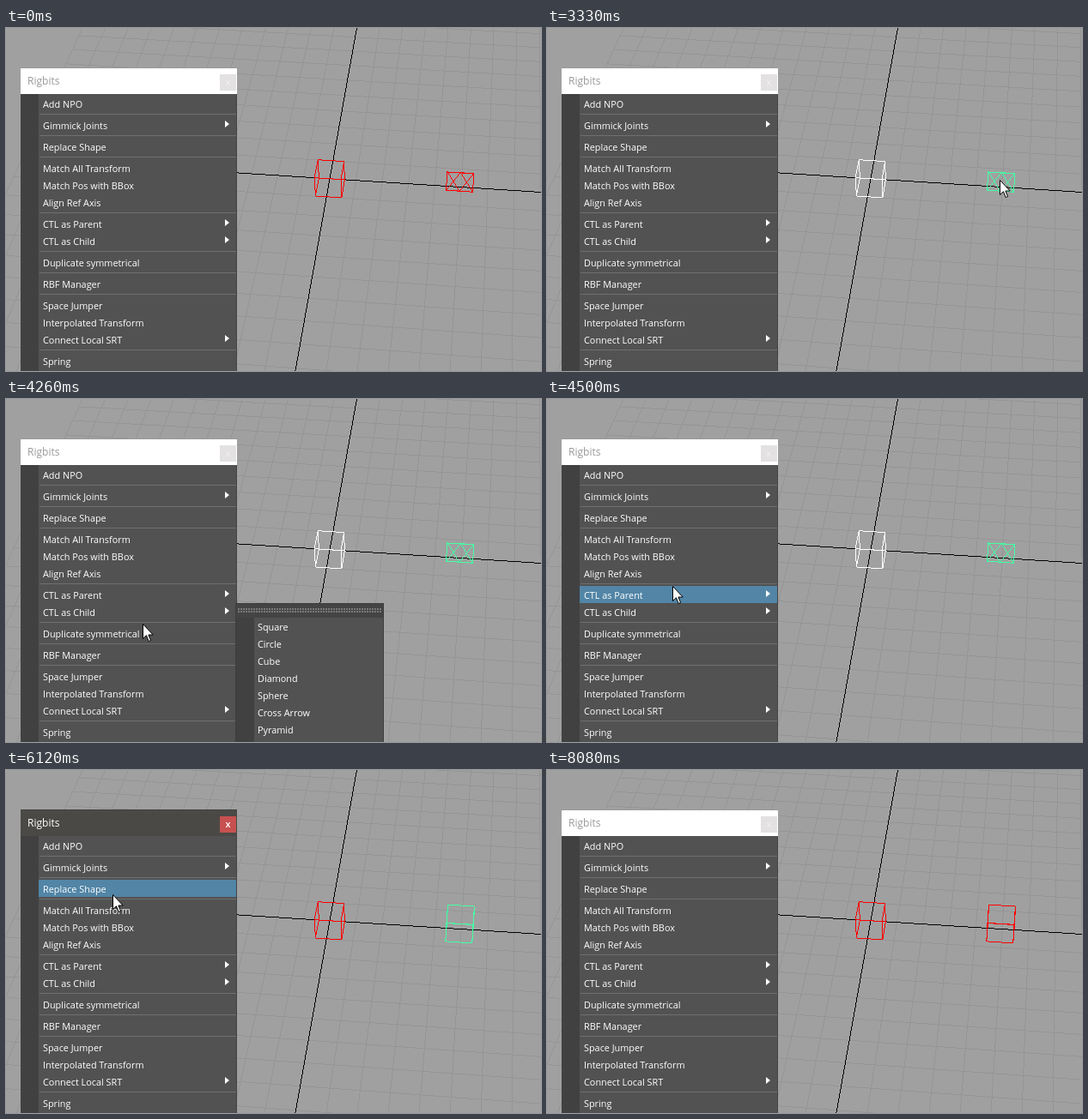
An HTML page with a canvas that plays this animation: 623x400 px, repeating every 9.07 s.

```html
<!DOCTYPE html>
<html lang="en">
<head>
<meta charset="utf-8">
<title>Rigbits: replace shape</title>
<style>
  html, body { margin: 0; width: 100%; height: 100%; overflow: hidden; background: #a0a0a0; }
  #stage { position: absolute; left: 0; top: 0; width: 623px; height: 400px; overflow: hidden;
    font: 10.85px/21px "Open Sans", "Noto Sans", sans-serif; color: #fff; }
  #stage * { position: absolute; box-sizing: border-box; white-space: nowrap; }
  .panel { background: #525252; border-right: 1px solid #434343; }
  .gutter { left: 0; bottom: 0; width: 21px; background: #414141; }
  #menu { left: 17px; top: 46px; width: 252px; height: 354px; }
  #menu .gutter { top: 31px; }
  #bar { left: 0; top: 0; width: 252px; height: 31px; background: #fff; color: #999; border-top: 1px solid #9a9a9a; }
  #bar b { left: 8px; top: -1px; font: 12px/31px "Open Sans", "Noto Sans", sans-serif; }
  #close { left: 232px; top: 7px; width: 19px; height: 19px; background: #e3e1e1; color: #f2f2f2;
    font-size: 11px; line-height: 17px; text-align: center; }
  #bar.on { background: #4b4946; color: #fff; border-color: #434140; }
  #bar.on #close { background: #c75050; color: #fff; font-weight: 600; }
  .row { left: 21px; width: 230px; height: 20px; padding-left: 5px; }
  .row.hot { background: #5285a6; }
  .rule { left: 22px; width: 229px; height: 1px; background: #707070; }
  .arrow { right: 8px; border: 4px solid transparent; border-left: 5px solid #fff; border-right: 0; }
  #sub { left: 267px; top: 238px; width: 173px; height: 170px; border: 1px solid #3c3c3c; }
  #sub .gutter { top: 16px; }
  #sub .row { left: 20px; }
  #tear { left: 0; top: 0; width: 171px; height: 16px; background: #444; }
  #tear i { left: 2px; top: 5px; width: 167px; height: 6px;
    background: radial-gradient(circle at 1px 1px, #7c7c7c .7px, transparent .9px) 0 0 / 3px 3px; }
  #cursor { left: 0; top: 0; overflow: visible; }
</style>
</head>
<body>
<div id="stage">
  <canvas id="view" width="623" height="400"></canvas>
  <div id="menu" class="panel">
    <div class="gutter"></div>
    <div id="bar"><b>Rigbits</b><span id="close">x</span></div>
  </div>
  <div id="sub" class="panel">
    <div class="gutter"></div>
    <div id="tear"><i></i></div>
  </div>
  <svg id="cursor" width="14" height="23">
    <path d="M.5 .5V17.5L4.5 13.7L7.2 20.5L9.6 19.5L6.9 13H12.2Z" fill="#fff" stroke="#000"/>
  </svg>
</div>
<script>
const LOOP = 9070, STEP = 75, W = 623, H = 400;
const RED = '#f00', GREEN = '#43ffa3', WHITE = '#fff';
const $ = id => document.getElementById(id);
const ctx = $('view').getContext('2d');
const start = performance.now();

// Menus: "-" starts a new group, ">" marks a submenu
function add(parent, cls, top, text = '') {
  const el = document.createElement('div');
  el.className = cls;
  el.style.top = top + 'px';
  el.textContent = text;
  parent.append(el);
  return el;
}

const labels = ['Add NPO', '-Gimmick Joints>', '-Replace Shape', '-Match All Transform',
  'Match Pos with BBox', 'Align Ref Axis', '-CTL as Parent>', 'CTL as Child>',
  '-Duplicate symmetrical', '-RBF Manager', '-Space Jumper', 'Interpolated Transform',
  'Connect Local SRT>', '-Spring'];
const rows = [];
let rowY = 78;
for (const label of labels) {
  if (label[0] === '-') {
    add($('menu'), 'rule', rowY + 2 - 46);
    rowY += 5;
  }
  const el = add($('menu'), 'row', rowY - 46, label.replace(/[->]/g, ''));
  if (label.endsWith('>')) add(el, 'arrow', 5);
  rows.push({ el, y: rowY });
  rowY += 20;
}
['Square', 'Circle', 'Cube', 'Diamond', 'Sphere', 'Cross Arrow', 'Pyramid']
  .forEach((name, i) => add($('sub'), 'row', 16 + 20 * i, name));

// Perspective: screen directions and depth change per world unit
function project(x, y, z) {
  const w = 1 - 0.00145 * x - 0.0157 * y - 0.0161 * z;
  return [376.5 + (30.4 * x - y - 3.76 * z) / w, 175.3 + (1.94 * x - 21.3 * y + 21 * z) / w];
}

// Hard one-pixel line, no smoothing
function line(c, a, b, color) {
  const dx = b[0] - a[0], dy = b[1] - a[1];
  const n = Math.ceil(Math.max(Math.abs(dx), Math.abs(dy))) || 1;
  c.fillStyle = color;
  for (let i = 0; i <= n; i++)
    c.fillRect(Math.round(a[0] + dx * i / n), Math.round(a[1] + dy * i / n), 1, 1);
}

const floor = document.createElement('canvas');
floor.width = W;
floor.height = H;
const fc = floor.getContext('2d');
fc.fillStyle = '#a0a0a0';
fc.fillRect(0, 0, W, H);
function gridLines(k, color) {
  line(fc, project(k, 0, -12), project(k, 0, 12), color);
  line(fc, project(-12, 0, k), project(12, 0, k), color);
}
for (let k = -12; k <= 12; k++) if (k) gridLines(k, '#959595');
gridLines(0, '#000');

// Calls fn with each corner of a unit square and the next corner
function eachSide(fn) {
  const corner = i => [i % 4 % 3 ? .5 : -.5, i % 4 < 2 ? -.5 : .5];
  for (let i = 0; i < 4; i++) fn(...corner(i), ...corner(i + 1));
}

function cube(cx, cy, color) {
  eachSide((x, z, nx, nz) => {
    for (const y of [cy - .5, cy + .5])
      line(ctx, project(cx + x, y, z), project(cx + nx, y, nz), color);
    line(ctx, project(cx + x, cy - .5, z), project(cx + x, cy + .5, z), color);
  });
}

function diamond(cx, cy, color) {
  eachSide((x, z, nx, nz) => {
    const p = project(cx + x, cy, z);
    line(ctx, p, project(cx + nx, cy, nz), color);
    for (const y of [cy - .5, cy + .5]) line(ctx, p, project(cx, y, 0), color);
  });
}

// Cursor stops: leave time, arrival time, x, y
const stops = [
  [70, 520, 379, 156],
  [930, 1000, 387, 184],
  [1160, 1390, 391, 195],
  [1770, 2180, 508, 147],
  [2400, 2780, 530, 183],
  [2930, 2930, 528, 149],
  [3330, 3330, 527, 177],
  [3410, 3640, 290, 250],
  [3720, 4260, 159, 262],
  [4340, 4890, 124, 145],
  [6830, 7130, 472, 313],
  [7680, 8080, 540, 405]
];

// The cursor advances in equal jumps, one per STEP
function cursorAt(t) {
  let x = 515, y = 405;
  for (const [t0, t1, tx, ty] of stops) {
    if (t < t0) break;
    const n = Math.round((t1 - t0) / STEP);
    const f = t >= t1 ? 1 : (1 + Math.floor((t - t0) / (t1 - t0) * n)) / (n + 1);
    x += (tx - x) * f;
    y += (ty - y) * f;
  }
  return [Math.round(x), Math.round(y)];
}

function draw(t) {
  ctx.drawImage(floor, 0, 0);
  const replaced = t >= 6120;
  cube(0, 0, t < 1390 || replaced ? RED : t < 2930 ? GREEN : WHITE);
  const shape = replaced ? cube : diamond;
  shape(4.94, .28, t >= 2930 && t < 7450 ? GREEN : RED);

  const [x, y] = cursorAt(t);
  $('cursor').style.transform = `translate(${x}px,${y}px)`;
  for (const row of rows)
    row.el.classList.toggle('hot', x >= 38 && x < 268 && y >= row.y && y < row.y + 20);
  $('bar').classList.toggle('on', t >= 5270 && t < 7300);
  $('sub').style.display = t >= 4040 && t < 4420 ? 'block' : 'none';
}

function tick() {
  draw((performance.now() - start) % LOOP);
  requestAnimationFrame(tick);
}
tick();
</script>
</body>
</html>
```
